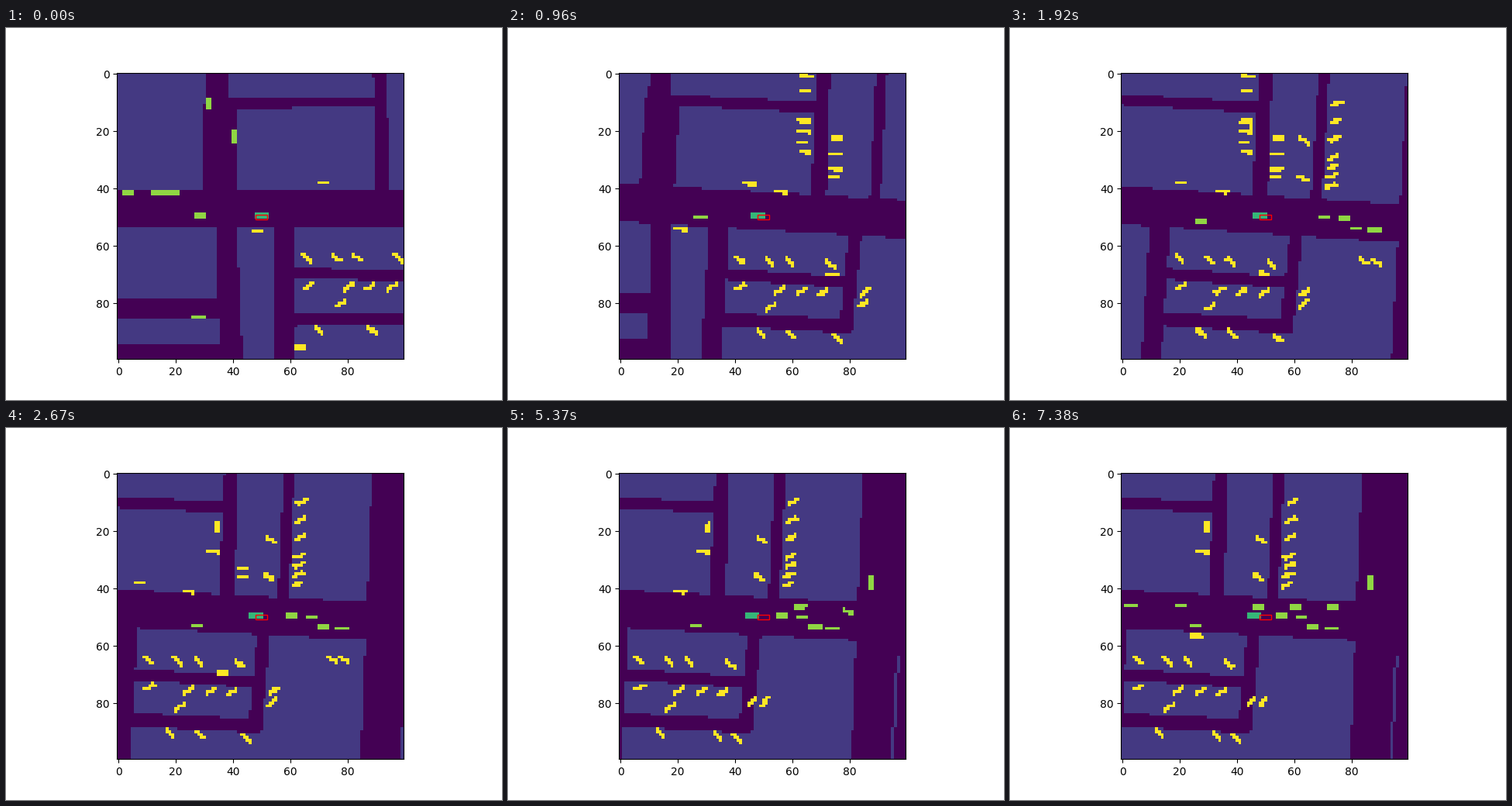
Animation, 640 px wide and 480 px high, one loop 7410 ms. Source, as a matplotlib script:

```python
import numpy as np
import matplotlib.pyplot as plt
from matplotlib.animation import FuncAnimation
from matplotlib.patches import Rectangle

FRAMES, STEP = 247, 30
N, CELL = 100, 3.696
ROAD, LAND, EGO, MOVING, PARKED = 0, 1, 4, 5, 6

# Camera keys: step, shift (screen pixels), heading (degrees).
KEYS = [0, 17, 46, 89, 136, 179, 246]
SHIFT = [0, -42.5, -123.5, -201.5, -214, -216, -220]
TURN = [0, 1.6, 4.3, 2.9, 3, 3, 3]

# Streets: start, end, width at each end, in pixels around the vehicle's start.
STREETS = [
    ((-400, -10.7), (400, -10.7), 49, 49),
    ((-58, -260), (-57, -147), 27, 29),
    ((-53, -147), (-53.5, -11), 44, 45),
    ((-57, -146.5), (150, -148), 14, 14),
    ((151, -260), (155.5, -11), 15, 21),
    ((226.5, -260), (228, -11), 14, 14),
    ((633, -260), (640, 320), 600, 600),
    ((-45.5, -11), (-37, 260), 25, 31),
    ((-400, 118), (-45, 118), 26, 26),
    ((-400, 243), (-40, 243), 160, 160),
    ((29, -11), (29, 320), 26, 26),
    ((29, 73.5), (202, 75), 14.5, 14.5),
    ((29, 132), (200, 131.5), 17.5, 17.5),
    ((206, -11), (200, 140), 17, 17),
]
ISLAND = ((391, 30), (391, 165), 3.7, 3.7)

# Standing cars by time on view; each row: x, y, count, gap, heading.
ALONG = {
    (0, 247): [(58, 53, 2, 118, 38), (96, 53, 2, 27, 38), (61, 89, 1, 0, -33),
               (112, 90, 3, 28, -35), (102, 112, 1, 0, -35)],
    (0, 30): [(74, 146, 2, 68, 42), (50, 168, 1, 0, 0)],
    (30, 247): [(91, 147, 2, 99, 40), (134, -90, 1, 0, 0)],
    (30, 112): [(130, 146, 1, 0, 42), (294, 41, 2, 16, 28)],
    (112, 247): [(165, 146, 1, 0, 48), (207, 99, 2, 16, -50)],
    (8, 210): [(106, -37, 1, 0, 6)],
    (205, 247): [(133, 19, 1, 0, 0)],
}
ACROSS = {
    (12, 112): [(221, 86, 2, 15, -45)],
    (30, 65): [(130, -188, 2, 20, 0), (131, -130, 3, 14, 0), (174, -110, 2, 20, 0)],
    (30, 130): [(174, -70, 2, 10, 0)],
    (36, 247): [(246, -90, 4, 12, -24)],
    (62, 247): [(246, -160, 3, 23, -27), (208, -109, 2, 48, 25),
                (138, -122, 1, 0, 92)],
}
WAITING = {
    (0, 60): [(-134, -31.5, 2, 19, 0), (-171, -31.5, 1, 0, 0)],
    (0, 10): [(-68, -145, 1, 0, 90), (-36, -103, 1, 0, 90), (-82, 129, 1, 0, 0)],
    (38, 247): [(239, -12.5, 2, 26, -3), (282, 0, 2, 23, -3)],
    (160, 247): [(352, -62, 1, 0, 90)],
}

# Bend driven by oncoming cars: distance from its far end, then x and y.
BEND_S = [0, 227, 285, 345, 390, 440]
BEND_X = [156, 383, 440, 494, 511, 513]
BEND_Y = [229, 231, 238, 266, 308, 360]

axis = (np.arange(N) + 0.5) * CELL
SX, SY = np.meshgrid(143.2 + axis - 330, 57.6 + axis - 244)


def glide(f, vals):
    """Smooth curve through the keys that never overshoots them."""
    h, d = np.diff(KEYS), np.diff(vals) / np.diff(KEYS)
    same = d[:-1] * d[1:] > 0
    mean = 2 * d[:-1] * d[1:] / np.where(same, d[:-1] + d[1:], 1)
    m = np.concatenate([d[:1], np.where(same, mean, 0), d[-1:]])
    i = int(np.clip(np.searchsorted(KEYS, f, "right") - 1, 0, len(h) - 1))
    u = (f - KEYS[i]) / h[i]
    ease = u * u * (3 - 2 * u)
    return (vals[i] * (1 - ease) + vals[i + 1] * ease
            + h[i] * u * (1 - u) * (m[i] * (1 - u) - m[i + 1] * u))


def to_world(f):
    a = np.radians(glide(f, TURN))
    qx = SX - glide(f, SHIFT)
    qy = SY - np.interp(f, [0, 20, 46, 89], [0, 0, -4, -1])
    c, s = np.cos(a), np.sin(a)
    return c * qx + s * qy, c * qy - s * qx


def strip(x, y, start, end, w0, w1):
    dx, dy = np.subtract(end, start)
    size = np.hypot(dx, dy)
    px, py = x - start[0], y - start[1]
    t = (px * dx + py * dy) / size**2
    off = abs(px * dy - py * dx) / size
    return (t >= 0) & (t <= 1) & (off < (w0 + (w1 - w0) * t) / 2)


def car(img, x, y, cx, cy, deg, value, width=5.4):
    a = np.radians(deg)
    dx, dy = 8.2 * np.cos(a), 8.2 * np.sin(a)
    img[strip(x, y, (cx - dx, cy - dy), (cx + dx, cy + dy), width, width)] = value


def rows(img, x, y, groups, f, value, ux, uy):
    for (start, end), lots in groups.items():
        if start <= f < end:
            for cx, cy, count, gap, deg in lots:
                for k in range(count):
                    car(img, x, y, cx + k * gap * ux, cy + k * gap * uy, deg, value)


def bend(s):
    return np.interp(s, BEND_S, BEND_X) - 330, np.interp(s, BEND_S, BEND_Y) - 244


def scene(f):
    x, y = to_world(f)
    img = np.full((N, N), LAND)
    for street in STREETS:
        img[strip(x, y, *street)] = ROAD
    img[strip(x, y, *ISLAND)] = LAND

    rows(img, x, y, ALONG, f, PARKED, 1, 0)
    rows(img, x, y, ACROSS, f, PARKED, 0, 1)
    rows(img, x, y, WAITING, f, MOVING, 1, 0)

    # Slow cars drifting back along the kerbs.
    if f < 145:
        for cx, cy in ((79, -45), (-6, 19), (193, 65)):
            car(img, x, y, cx - 0.42 * f, cy, 0, PARKED)

    # The car behind, then the oncoming traffic.
    car(img, SX, SY, -80 - 10 * f / FRAMES,
        np.interp(f, [0, 46, 89], [-2, 1, 11]), 0, MOVING)
    left = 3.3 * (FRAMES - 1 - f)
    for s in (left, left + 64):
        if s < 435:
            (ax0, ay0), (bx, by) = bend(s - 6), bend(s + 6)
            car(img, SX, SY, *bend(s), np.degrees(np.arctan2(by - ay0, bx - ax0)), MOVING)
    for k in range(3):
        car(img, SX, SY, -10 + 48 * k + left, -12.5, 0, MOVING)

    col = int(round(np.interp(f, [0, 40, 100, 180], [48, 46, 46, 44])))
    img[49:51, col:col + 5] = EGO
    return img


fig, ax = plt.subplots(figsize=(6.4, 4.8), dpi=100)
view = ax.imshow(scene(0), vmin=0, vmax=6, cmap="viridis")
ax.add_patch(Rectangle((48, 49.25), 4, 1.5, fill=False, ec="red", lw=1))


def update(f):
    view.set_data(scene(f))
    return [view]


anim = FuncAnimation(fig, update, frames=FRAMES, interval=STEP,
                     repeat=True, repeat_delay=0)
plt.show()
```
